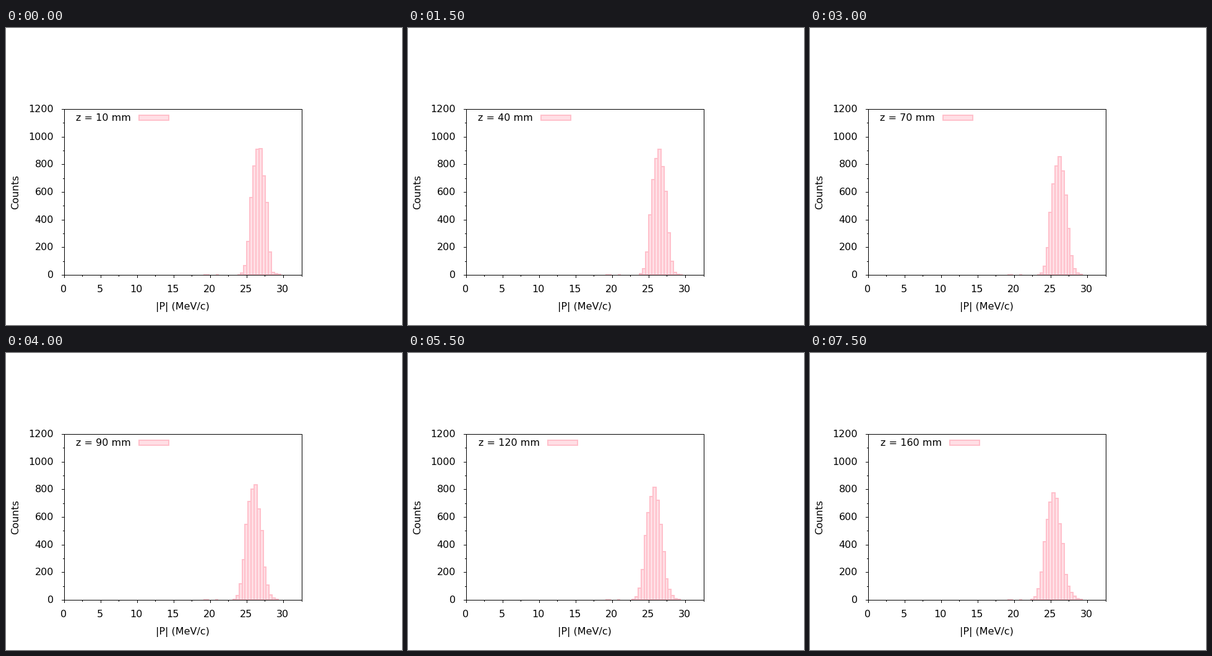
These frames come from a looping animation (640 px wide and 480 px high, 8 s). A matplotlib script:

```python
import math

import numpy as np
import matplotlib.pyplot as plt
from matplotlib.animation import FuncAnimation
from matplotlib.patches import Rectangle

W, H, DPI = 640, 480, 96
PX = 72 / DPI
LEFT, RIGHT, TOP, BOTTOM = 94, 478, 131, 399
X_MAX, Y_MAX = 32.5, 1200
DIGIT = 10.18  # advance of one digit at 12 pt
PINK, PALE = "#ffc0cb", "#ffdfe5"

plt.rcParams["font.family"] = "DejaVu Sans"
plt.rcParams["font.size"] = 12

# Bin edges in pixels: the binning gets finer from z = 70 mm on.
BINS = np.arange(72)
COARSE = 94 + 5 * BINS
FINE = 95.5 + 4.85 * BINS
REGRID_Z = 70

# The beam spectrum: where each normal score lies (in pixels) at the first and
# the last z. Energy loss moves every quantile evenly in between.
Z_FIRST, Z_LAST = 10, 160
SCORE = np.array([-3.5, -3, -2, -1, -0.5, 0, 0.5, 1, 1.5, 2, 2.5, 3, 3.5])
FIRST = np.array([378, 382.3, 390, 398.2, 403.1, 408.4, 413.5, 418.6, 422.3,
                  425.6, 428.7, 436, 444])
LAST = np.array([357, 363, 372.1, 382, 387.8, 394, 399.8, 406, 411.6,
                 419.4, 426.6, 432.5, 440])
STRAYS = [321, 326, 341]  # lone low-momentum particles


def bin_counts(z, edges):
    t = (z - Z_FIRST) / (Z_LAST - Z_FIRST)
    scores = np.interp(edges, FIRST + t * (LAST - FIRST), SCORE)
    cdf = np.array([0.5 + 0.5 * math.erf(s / math.sqrt(2)) for s in scores])
    beam = (4932 - 0.45 * z) * np.diff(cdf)
    return beam + np.histogram(STRAYS, edges)[0]


def x_px(value):
    return LEFT + value * (RIGHT - LEFT) / X_MAX


def y_px(value):
    return BOTTOM - value * (BOTTOM - TOP) / Y_MAX


fig = plt.figure(figsize=(W / DPI, H / DPI), dpi=DPI, facecolor="white")
ax = fig.add_axes([0, 0, 1, 1])
ax.set_xlim(0, W)
ax.set_ylim(H, 0)
ax.axis("off")


def line(x0, y0, x1, y1):
    """Draw a one-pixel line through pixel centres."""
    ax.plot([x0 + 0.5, x1 + 0.5], [y0 + 0.5, y1 + 0.5], color="black", lw=PX,
            solid_capstyle="projecting", snap=False, zorder=3)


def label(x, y, text, **kw):
    return ax.text(x, y, text, ha="left", va="baseline", color="black", **kw)


def box(x, y, w, h):
    return ax.add_patch(Rectangle((x, y), w, h, facecolor=PALE, edgecolor=PINK,
                                  lw=2 * PX, joinstyle="miter", zorder=2))


# Frame, ticks and labels
for y in (TOP, BOTTOM):
    line(LEFT, y, RIGHT, y)
for x in (LEFT, RIGHT):
    line(x, TOP, x, BOTTOM)

for i in range(14):
    x = x_px(2.5 * i)
    major = i % 2 == 0
    line(int(x), BOTTOM, int(x), BOTTOM + (4 if major else 2))
    if major:
        text = str(5 * i // 2)
        label(x - 1.4 - DIGIT * len(text) / 2, 427, text)

for i in range(13):
    y = round(y_px(100 * i))
    major = i % 2 == 0
    line(LEFT - (4 if major else 2), y, LEFT, y)
    if major:
        text = str(100 * i)
        label(77 - DIGIT * len(text), y + 5, text)

label(242, 455, "|P| (MeV/c)")
label(20, 293, "Counts", rotation=90, rotation_mode="anchor")

# Moving parts
key_text = label(0, 150, "")
key_box = box(215, 141, 48, 8)
bars = [box(0, 0, 0, 0) for _ in BINS[:-1]]


def update(frame):
    z = Z_FIRST + 10 * frame
    wide = z >= 100
    key_text.set_text(f"z = {z} mm")
    key_text.set_x(112.7 + wide)
    key_box.set_x(215 + 11 * wide)

    edges = COARSE if z < REGRID_Z else FINE
    sides = np.round(edges)
    for bar, count, x0, x1 in zip(bars, bin_counts(z, edges), sides, sides[1:]):
        top = y_px(count)
        bar.set_bounds(x0, top, x1 - x0, BOTTOM - top)
        bar.set_visible(bool(count >= 0.5))
    return [key_text, key_box, *bars]


anim = FuncAnimation(fig, update, frames=16, interval=500, repeat=True,
                     repeat_delay=0, blit=False)
plt.show()
```
